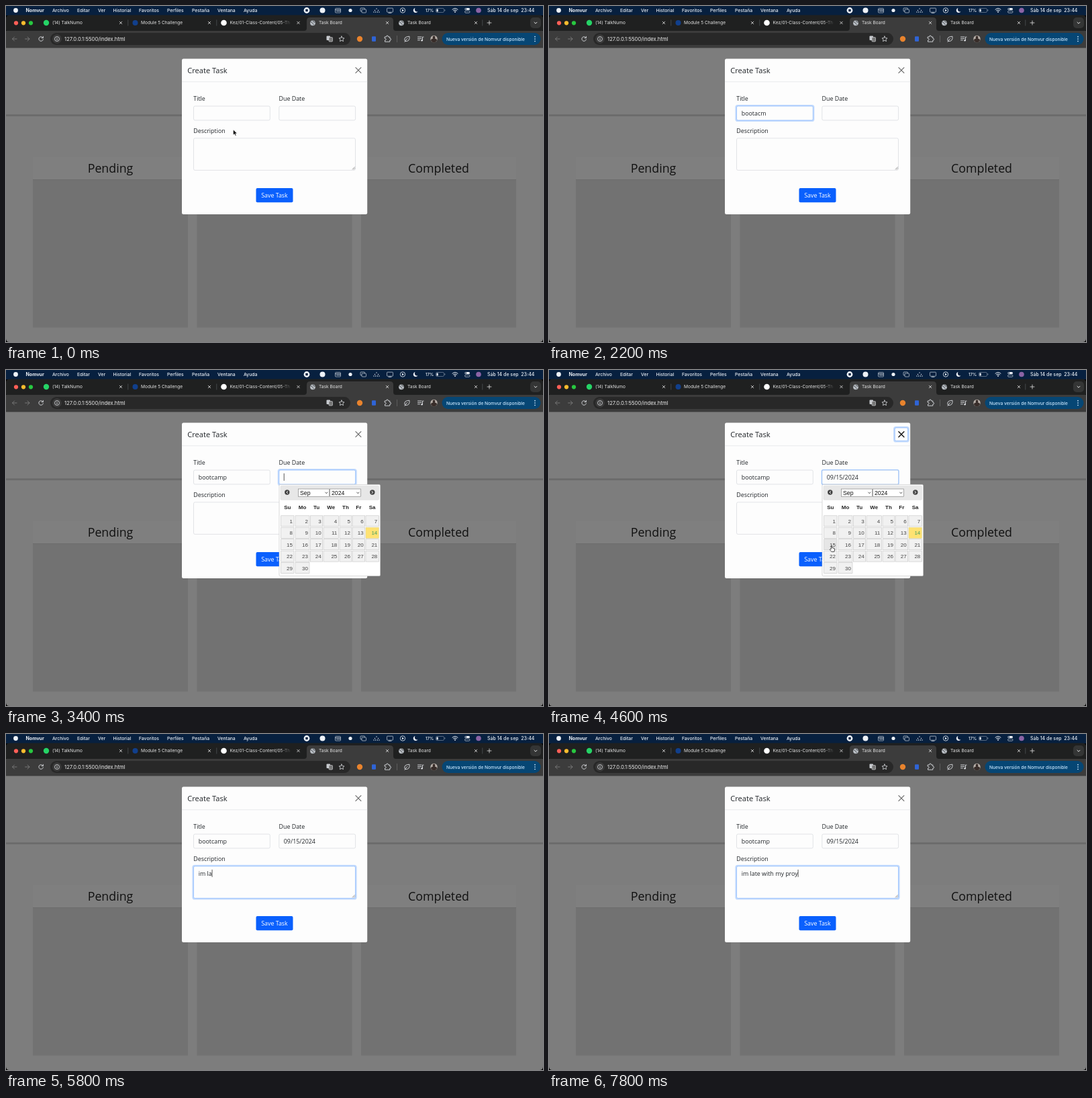
Write an HTML page that moves like this. It is 800 px wide and 500 px high and loops after 8 s.

```html
<!DOCTYPE html>
<html lang="es">
<head>
<meta charset="utf-8">
<title>Task Board</title>
<style>
  html, body { margin: 0; width: 100%; height: 100%; overflow: hidden; background: #000; }
  svg { display: block; width: 800px; height: 500px; }
  text { white-space: pre; }
  .ui { font-family: Inter, sans-serif; }
  .page { font-family: "Open Sans", sans-serif; }
  .cal { font-family: "Liberation Sans", Arial, sans-serif; }
  .line { fill: none; stroke-linecap: round; stroke-linejoin: round; }
</style>
</head>
<body>
<svg id="stage" viewBox="0 0 800 500"></svg>
<script>
const stage = document.getElementById('stage');

// Markup helpers
const rect = (x, y, w, h, fill, r = 0, extra = '') =>
  `<rect x="${x}" y="${y}" width="${w}" height="${h}" rx="${r}" fill="${fill}" ${extra}/>`;
const dot = (x, y, r, fill, extra = '') =>
  `<circle cx="${x}" cy="${y}" r="${r}" fill="${fill}" ${extra}/>`;
const line = (d, color, width = .8) =>
  `<path class="line" d="${d}" stroke="${color}" stroke-width="${width}"/>`;
const ring = (x, y, r, color, width = .8) =>
  dot(x, y, r, 'none', `stroke="${color}" stroke-width="${width}"`);
const text = (x, y, s, size, fill, cls, extra = '') =>
  `<text x="${x}" y="${y}" font-size="${size}" fill="${fill}" class="${cls}" ${extra}>${s}</text>`;
const cross = (x, y, r, color, width) =>
  line(`M${x - r} ${y - r}l${2 * r} ${2 * r}m0 ${-2 * r}l${-2 * r} ${2 * r}`, color, width);
const outline = color => `stroke="${color}" stroke-width=".6"`;

function menuBar() {
  const w = '#eef2f8';
  const menus = [[69, 'Archivo'], [106, 'Editar'], [137, 'Ver'], [159.5, 'Historial'], [198, 'Favoritos'],
    [240, 'Perfiles'], [277, 'Pestaña'], [315, 'Ventana'], [354, 'Ayuda']];
  return rect(0, 0, 800, 14, '#07203f') + dot(14.5, 6.5, 3.4, w)
    + text(29.5, 9, 'Nomvur', 7, w, 'ui', 'font-weight="700"')
    + menus.map(([x, s]) => text(x, 9, s, 6.8, w, 'ui', 'font-weight="500"')).join('')
    + dot(448, 6.5, 4.4, w) + rect(446.3, 4.8, 3.4, 3.4, '#07203f', .5)
    + dot(471.5, 6.5, 4, w)
    + rect(490.5, 3.5, 8, 6.5, 'none', 1, outline(w)) + line('M491 5.6h7m-5.5 2h1m1 0h1m1 0h1', w)
    + dot(513, 6.5, 2.6, w)
    + rect(528, 3, 6.5, 5, 'none', 1, outline(w)) + rect(530, 5, 6.5, 5, '#07203f', 1, outline(w))
    + [[552, 4], [549.5, 6.5], [554.5, 6.5], [548, 9], [550.7, 9], [553.4, 9], [556, 9]]
      .map(([x, y]) => dot(x, y, .7, w)).join('')
    + rect(567.5, 3.2, 9, 6, 'none', 1, outline(w)) + line('M570 10.3h4', w)
    + ring(591, 6.5, 3.7, w) + `<path d="M590 4.8l3 1.7-3 1.7z" fill="${w}"/>`
    + `<path d="M609.5 3a3.6 3.6 0 1 0 4 5.2a3.4 3.4 0 0 1-4-5.2z" fill="${w}"/>`
    + text(625, 9, '17%', 6.2, w, 'ui', 'font-weight="500"')
    + rect(640.5, 3.5, 12, 6, 'none', 1.7, outline('#8b98aa')) + rect(641.5, 4.5, 2.2, 4, w, .6) + rect(653.4, 5.4, .9, 2, '#8b98aa')
    + line('M665 5.2q4-3.4 8 0m-6.5 1.7q2.5-2 5 0', w, 1) + dot(669, 8.8, 1, w)
    + rect(683.5, 3, 7.5, 3, w, 1.5) + rect(683.5, 7.2, 7.5, 3, 'none', 1.5, outline(w)) + dot(685.2, 4.5, .9, '#07203f')
    + dot(704, 6.5, 3.8, '#8b63a5')
    + text(717, 9, 'Sáb 14 de sep  23:44', 7, w, 'ui', 'font-weight="500"');
}

function globe(x, y) {
  return dot(x, y, 3.9, '#b9bec4') + line(`M${x - 3} ${y - 1.5}q2 0 2.5 1.5t2 2.5m-1-5.5q0 2 2.8 2`, '#45494d', 1);
}

function tabStrip() {
  const c = '#e3e3e3';
  const tab = (x, s, closeX) => text(x, 27.4, s, 6.6, c, 'ui') + cross(closeX, 25, 1.8, c, .8);
  return rect(0, 13.5, 800, 26, '#1f2020', 5)
    + ['#ff5f57', '#febc2e', '#28c840'].map((f, i) => dot(15 + 11 * i, 25.3, 3.1, f)).join('')
    + `<path d="M444 37q4 0 4-4v-11q0-5 5-5h119q5 0 5 5v11q0 4 4 4z" fill="#3c3c3c"/>`
    + dot(60, 25, 4.2, '#25d366') + tab(69, '(14) TalkNumo', 171)
    + dot(192.5, 25, 4, '#113f8c') + tab(201, 'Module 5 Challenge', 303)
    + dot(324.5, 25, 4.3, '#fff') + tab(333.5, 'Kez/01-Class-Content/05-Th', 435.5)
    + rect(408, 19, 18, 12, 'url(#fade)')
    + globe(457, 25.3) + tab(466, 'Task Board', 568)
    + globe(589, 25.3) + tab(598, 'Task Board', 700)
    + [181.5, 313.5, 709.5].map(x => rect(x, 20.5, .7, 9, '#55585b')).join('')
    + line('M717 25h6m-3-3v6', c)
    + rect(781, 17, 16, 16, '#343535', 5) + line('M787 24.2l2 2 2-2', c, 1);
}

function toolbar() {
  const c = '#dadce0', dim = '#7b7b7b';
  return rect(0, 37, 800, 25.5, '#3c3c3c')
    + line('M16 49h-6.5m3-3l-3 3 3 3', dim, .9) + line('M28.5 49h6.5m-3-3l3 3-3 3', dim, .9)
    + line('M55 47.2a3.3 3.3 0 1 0 .4 2.6M55.4 45.3v2.3h-2.3', c, .9)
    + rect(66, 40, 447, 18, '#282828', 9) + dot(76, 49, 6.8, '#3a3a3a')
    + ring(76, 49, 3.5, c) + line('M76 48.7v2M76 47.1v.1', c, .9)
    + text(87, 51.8, '127.0.0.1:5500/index.html', 7.7, '#eee', 'ui')
    + rect(477.5, 44.5, 5.5, 6.5, '#c8cbd0', 1) + rect(481, 46.5, 5.5, 6.5, '#777', 1, outline(c))
    + line('M500 45l1.2 2.6 2.8.3-2.1 1.9.6 2.8-2.5-1.4-2.5 1.4.6-2.8-2.1-1.9 2.8-.3z', c)
    + dot(527, 49, 4.2, '#e8832d') + rect(545, 45.2, 6, 7.6, '#2f64d6', 1)
    + line('M564.5 46h2q0-2 1.5-2t1.5 2h2.3v2.2q1.8 0 1.8 1.4t-1.8 1.4v2.2h-7.3v-2.2q1.8-.2 1.8-1.4t-1.8-1.4z', c, .9)
    + rect(582, 44, .8, 10, '#666')
    + line('M594 51.5q-2-6 7-6.3q1 8-6 7.3m-1 .8q2-4 4-5', c, .9)
    + line('M613.5 46h5.5m-5.5 2.4h5.5m-5.5 2.4h3m4 .8v-5.5h1.5', c, .9) + dot(619.5, 51.2, 1.2, c)
    + dot(637.5, 49, 5.2, '#b8b0aa') + '<path d="M633 51.5q0-3 3-3q-1.2-4 1.5-4t1.5 4q3 0 3 3q-1.8 2.7-4.5 2.7t-4.5-2.7z" fill="#382d2a"/>'
    + rect(649.5, 40, 147, 18, '#064674', 9)
    + text(656, 51.5, 'Nueva versión de Nomvur disponible', 6.65, '#c9e7ff', 'ui', 'font-weight="500"')
    + [45.7, 49, 52.3].map(y => dot(788, y, .85, '#d4ecff')).join('');
}

function board() {
  const columns = [40, 284.5, 529].map(x =>
    rect(x, 225, 231, 34, '#7f7f7f') + rect(x, 259, 231, 219.5, '#727272') + rect(x, 258, 231, .8, '#686868')).join('');
  const heading = (x, s) => text(x, 247.6, s, 17.8, '#111', 'page', 'text-anchor="middle"');
  return rect(0, 62.3, 800, 438, '#7d7d7d') + rect(0, 161.3, 800, 2.8, '#6b6b6b') + columns
    + heading(155.5, 'Pending') + heading(400, 'In Progress') + heading(644.5, 'Completed')
    + '<path d="M0 495v5h5q-5 0-5-5zM800 495v5h-5q5 0 5-5z" fill="#000"/>';
}

const fields = {
  title: [279.5, 149, 113.8, 21],
  date: [406.8, 149, 113.8, 21],
  note: [279.5, 196.8, 241, 47.6],
  close: [515.2, 86, 19.4, 19.4]
};

function modal() {
  const label = (x, y, s) => text(x, y, s, 8.89, '#212529', 'page');
  return rect(262, 78.5, 276.2, 231.5, '#fdfdfd', 2.5) + rect(262, 112.5, 276.2, .7, '#dee2e6')
    + text(270.3, 99.6, 'Create Task', 11.11, '#212529', 'page')
    + label(279.3, 141, 'Title') + label(406.5, 141, 'Due Date') + label(279.3, 188.8, 'Description')
    + ['title', 'date', 'note'].map(k => rect(...fields[k], '#fdfdfd', 2, outline('#ced2d7'))).join('')
    + rect(372.5, 271, 55, 21.3, '#0a60fd', 2)
    + text(400, 284.9, 'Save Task', 8.89, '#fff', 'page', 'text-anchor="middle"');
}

function calendar() {
  const left = [409.7, 431, 453.5, 473, 497, 516, 536], right = [429, 452, 471.7, 495.3, 515, 534.7, 555.3];
  const picker = (x, s) => rect(x, 177, 46, 11.2, '#fff', 0, outline('#777'))
    + text(x + 2.5, 185.8, s, 8.7, '#111', 'cal') + line(`M${x + 40.2} 182l1.6 1.7 1.6-1.7`, '#222');
  let out = rect(407, 170.5, 150.5, 136, '#fff', 1.5, outline('#c5c5c5'))
    + rect(409, 172.3, 146.5, 21, '#e7e7e7', 1.5, outline('#ddd'))
    + dot(418.8, 182, 3.7, '#444') + line('M419.6 180.4l-1.6 1.6 1.6 1.6', '#fff', 1)
    + dot(545.8, 182, 3.7, '#444') + line('M545 180.4l1.6 1.6-1.6 1.6', '#fff', 1)
    + picker(435.5, 'Sep') + picker(482.5, '2024');
  ['Su', 'Mo', 'Tu', 'We', 'Th', 'Fr', 'Sa'].forEach((s, i) =>
    out += text((left[i] + right[i]) / 2, 207.3, s, 8, '#222', 'cal', 'font-weight="700" text-anchor="middle"'));
  for (let day = 1; day <= 30; day++) {
    const i = (day - 1) % 7, y = 216.8 + 17.45 * Math.floor((day - 1) / 7), today = day === 14;
    out += rect(left[i], y, right[i] - left[i], 16, today ? '#ffe272' : '#f1f1f1', 0,
        `${outline(today ? '#dcd28a' : '#c5c5c5')} id="day${day}"`)
      + text(right[i] - 2, y + 10.9, day, 8, today ? '#3a9b62' : '#454545', 'cal', 'text-anchor="end"');
  }
  return out;
}

const focusRing = '<rect fill="#fdfdfd" stroke="#86b7fe" stroke-width=".7"/>';
stage.innerHTML = `<defs><linearGradient id="fade"><stop stop-color="#1f2020" stop-opacity="0"/>
  <stop offset="1" stop-color="#1f2020"/></linearGradient></defs>`
  + menuBar() + tabStrip() + toolbar() + board() + modal()
  + `<g id="focus"><rect id="glow" fill="#c2dafd"/>${focusRing}</g>`
  + `<g id="dateGlow">${rect(406.4, 148.6, 114.6, 21.8, 'none', 2, 'stroke="#9fc5fb" stroke-width="1.3"')}</g>`
  + '<g id="closeX"></g>' + line('M516.2 243l3.3-3.3m-1.4 3.5l1.6-1.6', '#555', .6)
  + text(286.7, 162.7, '', 8.89, '#212529', 'page', 'id="title"')
  + text(413.8, 162.7, '', 8.89, '#212529', 'page', 'id="date"')
  + text(286.7, 210.6, '', 8.89, '#212529', 'page', 'id="note"')
  + rect(0, 0, .7, 11, '#111', 0, 'id="caret"')
  + `<g id="calendar">${calendar()}</g>`
  + `<g id="pointer" stroke-linejoin="round">
      <path id="arrow" d="M0 0v8l1.9-1.7 1.3 2.9 1.4-.6-1.3-2.8h2.5z" fill="#000" stroke="#fff" stroke-width=".6"/>
      <path id="hand" d="M-.7 4.5V0q.8-1.2 1.5 0v2.6l3.2.8q.8.3.6 1.6l-.7 3.4h-4L-2.8 5.2q.4-1.2 2.1-.7z" fill="#fff" stroke="#000" stroke-width=".7"/>
      <path id="beam" class="line" d="M-1.5-4.5q1.5 0 1.5 1v7q0 1-1.5 1m3-9q-1.5 0-1.5 1v7q0 1 1.5 1" stroke="#111" stroke-width=".7"/>
    </g>`;

const el = id => document.getElementById(id);

// [time, text] keys for each typed value
const typed = {
  title: [[0, ''], [600, 'b'], [800, 'bo'], [1000, 'boo'], [1200, 'boot'], [1400, 'boota'], [1600, 'bootacm'],
    [2400, 'bootac'], [2600, 'boot'], [2800, 'bootca'], [3000, 'bootcamp']],
  date: [[0, ''], [4600, '09/15/2024']],
  note: [[0, ''], [5400, 'i'], [5600, 'im '], [5800, 'im la'], [6000, 'im lat'], [6200, 'im late'], [6400, 'im late '],
    [6600, 'im late w'], [6800, 'im late wit'], [7000, 'im late with '], [7200, 'im late with m'],
    [7400, 'im late with my '], [7600, 'im late with my pr'], [7800, 'im late with my proy']]
};
const focusKeys = [[0, ''], [400, 'title'], [3200, 'date'], [4600, 'close'], [5200, 'note']];
// [time, x, y, shape]; no shape hides the pointer
const pointerKeys = [[0, 338.5, 184, 'arrow'], [200, 334, 173, 'arrow'], [400, 331, 161, 'beam'], [600, 331, 161, ''],
  [3600, 331, 161, 'beam'], [3800, 352, 186, 'arrow'], [4000, 385, 225, 'arrow'], [4200, 412, 255, 'hand'],
  [4400, 421, 262, 'hand'], [4800, 418, 252, 'arrow'], [5000, 396, 228, 'beam'], [5400, 390, 224, '']];
const latest = (keys, t) => keys.filter(k => k[0] <= t).pop();

function show(id, on) { el(id).style.display = on ? '' : 'none'; }
function place(node, [x, y, w, h], grow, radius) {
  const box = { x: x - grow, y: y - grow, width: w + 2 * grow, height: h + 2 * grow, rx: radius };
  for (const k in box) node.setAttribute(k, box[k]);
}

function draw(t) {
  for (const k in typed) el(k).textContent = latest(typed[k], t)[1];

  const [focusTime, focus] = latest(focusKeys, t);
  show('focus', focus);
  if (focus) {
    place(el('glow'), fields[focus], 2.1, 3.6);
    place(el('focus').lastElementChild, fields[focus], 0, 2);
  }
  const closing = focus === 'close';
  show('dateGlow', closing && t < 4800);
  el('closeX').innerHTML = cross(524.9, 95.7, 4, closing ? '#111' : '#666', closing ? 1.4 : 1.1);

  const typing = focus && !closing;
  const since = typing ? Math.max(focusTime, latest(typed[focus], t)[0]) : 0;
  show('caret', typing && (t - since) % 1000 < 500);
  if (typing) {
    const node = el(focus);
    el('caret').setAttribute('x', +node.getAttribute('x') + node.getComputedTextLength());
    el('caret').setAttribute('y', focus === 'note' ? 201.8 : 153.8);
  }

  show('calendar', t >= 3200 && t < 4800);
  el('calendar').setAttribute('opacity', t < 3400 ? .6 : 1);
  el('day15').setAttribute('fill', t >= 4400 ? '#e6e6e6' : '#f1f1f1');

  const [, x, y, shape] = latest(pointerKeys, t);
  for (const s of ['arrow', 'hand', 'beam']) show(s, s === shape);
  el('pointer').setAttribute('transform', `translate(${x} ${y})`);
}

const start = performance.now();
function tick() {
  const t = (performance.now() - start) % 8000;
  draw(Math.floor(t / 200) * 200);
  requestAnimationFrame(tick);
}
tick();
</script>
</body>
</html>
```
